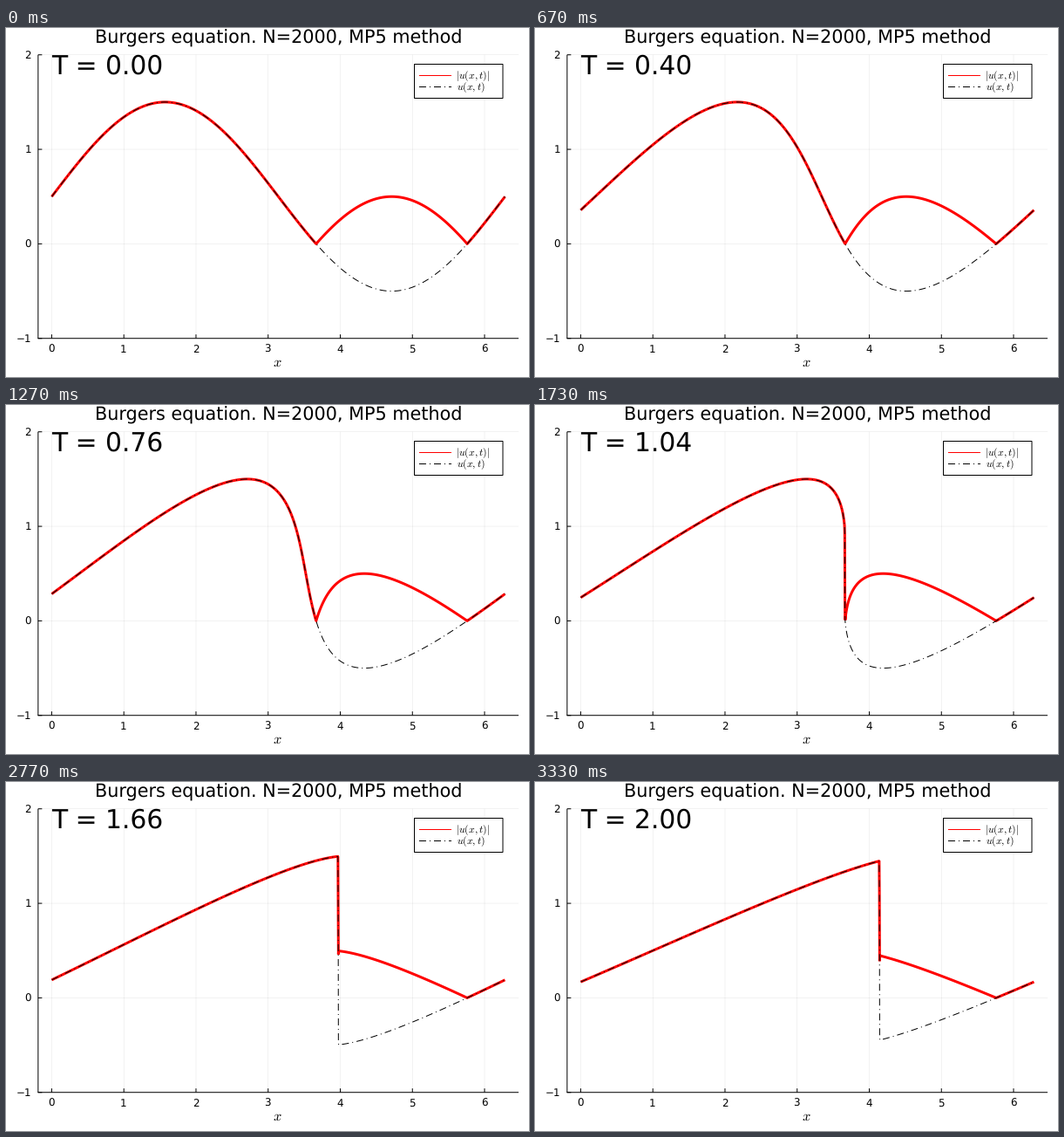
Animation of 600x400 px, one loop 3360 ms. Source, as a matplotlib script:

```python
import numpy as np
import matplotlib
import matplotlib.pyplot as plt
from matplotlib.animation import FuncAnimation
from matplotlib.lines import Line2D
from matplotlib.patches import Rectangle

W, H, DPI = 600, 400, 100
PT = 72 / DPI                      # points per pixel
LOOP_MS, FRAMES, DT = 3360, 101, 0.02
CELLS = 2000
DX = 2 * np.pi / CELLS
DASH_DOT = (0, (8, 4, 1, 4))
X0, X_UNIT = 52.45, 82.76          # pixel of x = 0, pixels per unit
Y0, Y_UNIT = 247.4, 108.33         # pixel of u = 0, pixels per unit
X_MIN, X_MAX = -0.06 * np.pi, 2.06 * np.pi
U_MIN, U_MAX = -1, 2
TICK = 4.5

matplotlib.rcParams.update({
    "font.family": "DejaVu Sans",
    "mathtext.fontset": "cm",
    "text.hinting": "none",
    "lines.dash_capstyle": "butt",
    "lines.solid_capstyle": "butt",
    "lines.solid_joinstyle": "miter",
    "path.simplify": False,
})

x = np.arange(CELLS + 1) * DX


def px(value):
    return X0 + X_UNIT * value


def py(value):
    return Y0 - Y_UNIT * value


def solve(t):
    """Burgers solution for u0 = 1/2 + sin x, with a slightly smeared shock."""
    y = x - np.pi - 0.5 * t
    y = (y + np.pi) % (2 * np.pi) - np.pi
    dist = np.abs(y)
    eta = np.full_like(dist, np.pi)
    for _ in range(50):            # Newton descends to the largest root
        slope = np.maximum(1 - t * np.cos(eta), 1e-9)
        eta = np.maximum(eta - (eta - t * np.sin(eta) - dist) / slope, 0)
    v = -np.sign(y) * np.sin(eta)
    if t > 1:
        v *= np.tanh(2.5 * dist / DX)
    return 0.5 + v


fig = plt.figure(figsize=(W / DPI, H / DPI), dpi=DPI, facecolor="white")


def put(left, base, text, size, ha="center"):
    """Place text by its baseline, in pixels from the top left."""
    return fig.text(left / W, 1 - base / H, text, fontsize=size * PT, ha=ha,
                    va="baseline", color="black", zorder=10)


def segment(x0, y0, x1, y1, width=1, color="black", zorder=9, **style):
    fig.add_artist(Line2D([x0 / W, x1 / W], [1 - y0 / H, 1 - y1 / H],
                          linewidth=width * PT, color=color, zorder=zorder,
                          snap=False, **style))


left, right, top, bottom = px(X_MIN), px(X_MAX), py(U_MAX), py(U_MIN)
grid = dict(width=0.5, alpha=0.1, zorder=-1)

for n in range(7):
    segment(px(n), top, px(n), bottom, **grid)
    segment(px(n), bottom, px(n), bottom - TICK)
    put(px(n) - 0.5, 372, str(n), 11.9)
for n in range(U_MIN, U_MAX + 1):
    segment(left, py(n), right, py(n), **grid)
    segment(left, py(n), left + TICK, py(n))
    put(29, py(n) + 4.4, str(n).replace("-", "\u2212"), 11.9, "right")
segment(left - 0.5, bottom, right, bottom)
segment(left, top, left, bottom)

put(312.5, 18, "Burgers equation. N=2000, MP5 method", 20.8)
put(311.5, 388, "$x$", 16.4)
clock = put(52.3, 53, "", 29.8, "left")

fig.add_artist(Rectangle((468.5 / W, 1 - 80.5 / H), 101.5 / W, 39 / H,
                         facecolor="white", edgecolor="black",
                         linewidth=PT, zorder=8, snap=False))
segment(474, 54.5, 511, 54.5, color="red")
segment(474, 67.5, 511, 67.5, linestyle=DASH_DOT)
put(515.6, 58, "$|u(x,t)|$", 11.7, "left")
put(516.6, 71, "$u(x,t)$", 11.7, "left")

ax = fig.add_axes([left / W, 1 - bottom / H, (right - left) / W, (bottom - top) / H])
ax.set_xlim(X_MIN, X_MAX)
ax.set_ylim(U_MIN, U_MAX)
ax.axis("off")
size_line, = ax.plot([], [], color="red", linewidth=3 * PT, snap=False)
wave_line, = ax.plot([], [], color="black", linewidth=PT,
                     linestyle=DASH_DOT, snap=False)


def draw(i):
    t = i * DT
    u = solve(t)
    size_line.set_data(x, np.abs(u))
    wave_line.set_data(x, u)
    clock.set_text(f"T = {t:.2f}")
    return size_line, wave_line, clock


anim = FuncAnimation(fig, draw, frames=FRAMES, init_func=lambda: draw(0),
                     interval=LOOP_MS / FRAMES, repeat=True, repeat_delay=0)
plt.show()
```
